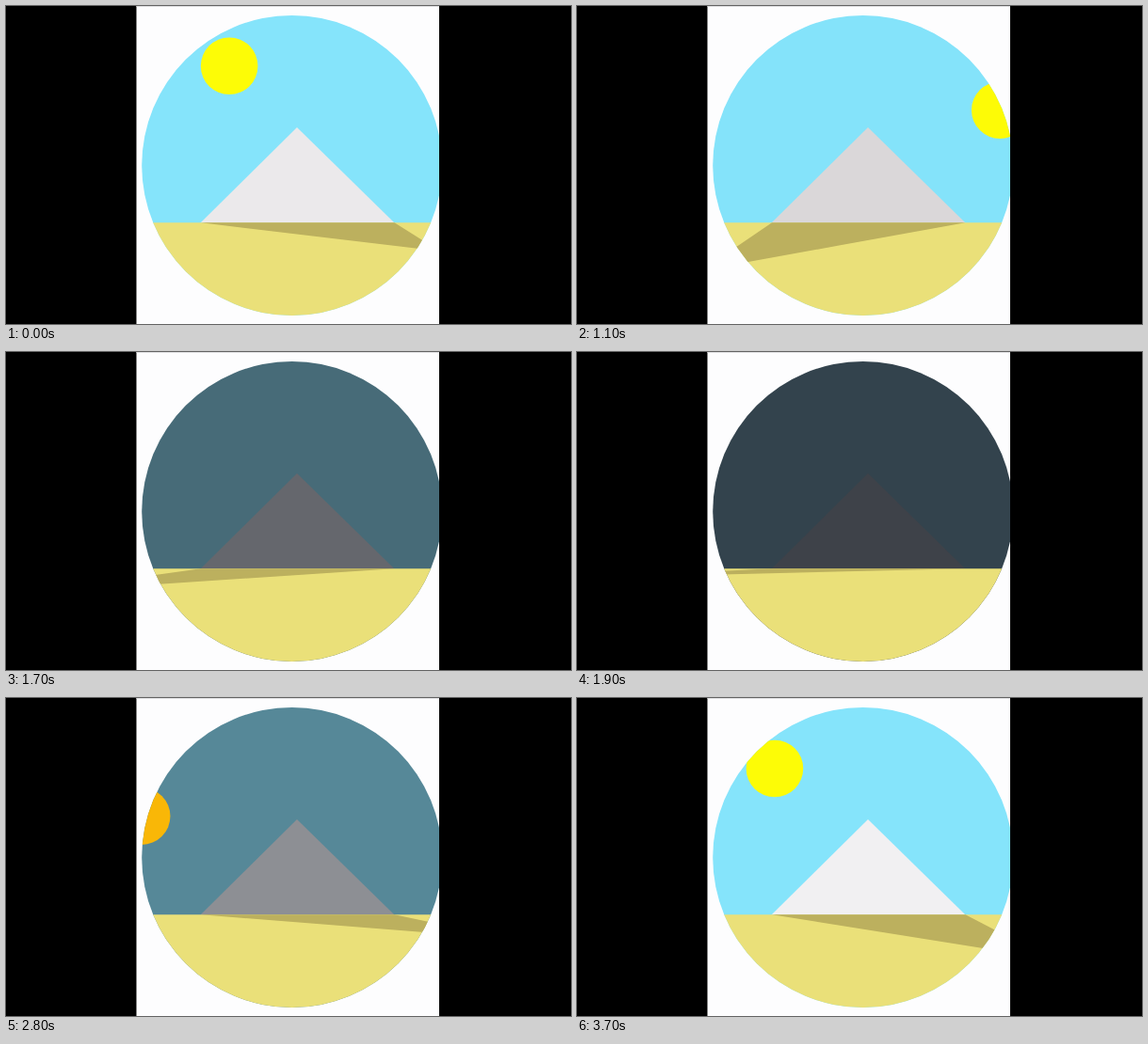
Write an HTML page that moves like this. It is 600 by 338 pixels and loops after 3800 ms.

```html
<!DOCTYPE html>
<html lang="en">
<head>
<meta charset="utf-8">
<title>Pyramid day</title>
<style>
  html, body { margin: 0; height: 100%; overflow: hidden; background: #000; }
  svg { display: block; width: 100vw; height: 100vh; }
</style>
</head>
<body>
<svg viewBox="0 0 600 338">
  <clipPath id="disc"><circle cx="303.7" cy="169.5" r="159.5"/></clipPath>
  <clipPath id="card"><path d="M138.5 0H460V338H138.5z"/></clipPath>
  <path fill="#000" d="M0 0H600V338H0z"/>
  <g clip-path="url(#card)">
    <path fill="#fdfdfe" d="M138 0H461V338H138z"/>
    <path fill="#dcdcde" d="M138 0H461V1H138z"/>
    <g clip-path="url(#disc)">
      <path id="sky" d="M138 0H470V338H138z"/>
      <circle id="sun" r="30.3"/>
      <path id="pyramid" d="M206.5 230.5L309 129L412.5 230.5z"/>
      <path fill="#eae079" d="M138 230.3H470V338H138z"/>
      <path id="shadow" fill="#bcb05e"/>
    </g>
  </g>
</svg>
<script>
const LOOP = 3800, STEP = 100;   // playback
const DAY = 4000, START = 1769, RATE = 0.994;
const $ = id => document.getElementById(id);

// cubic-bezier(.4, 0, .49, 1), solved by bisection
function ease(x) {
  let lo = 0, hi = 1, t;
  for (let i = 0; i < 24; i++) {
    t = (lo + hi) / 2;
    const s = 1 - t;
    if (1.2 * s * s * t + 1.47 * s * t * t + t * t * t < x) lo = t; else hi = t;
  }
  return t * t * (3 - 2 * t);
}

// keys: [[position, value or list of values], ...], eased between neighbours
function track(keys, p) {
  const i = keys.findIndex(k => k[0] > p);
  const [p0, a] = keys[i - 1], [p1, b] = keys[i];
  const e = ease((p - p0) / (p1 - p0));
  const mix = (u, v) => u + (v - u) * e;
  return Array.isArray(a) ? a.map((u, j) => mix(u, b[j])) : mix(a, b);
}

const NIGHT = [39, 44, 52], BLUE = [133, 228, 251];
const ORANGE = [245, 114, 9], YELLOW = [253, 252, 6];
const sky = [[0, NIGHT], [.3, BLUE], [.7, BLUE], [1, NIGHT]];
const sun = [[0, ORANGE], [.3, YELLOW], [.7, YELLOW], [1, ORANGE]];
const stone = [[0, NIGHT], [.3, [242, 241, 243]], [.7, [219, 216, 218]], [1, NIGHT]];
const angle = [[0, -70], [.3, -28], [1, 70]];
const tipX = [[0, 560], [.3, 512], [1, -9]];
const length = [[0, 0], [.3, 1], [.55, .4], [.75, 1], [1, 0]];

function draw(ms) {
  const p = (START + ms * RATE) % DAY / DAY;
  const paint = (id, keys) =>
    $(id).setAttribute('fill', `rgb(${track(keys, p).map(Math.round)})`);
  paint('sky', sky);
  paint('sun', sun);
  paint('pyramid', stone);
  const a = track(angle, p) * Math.PI / 180;
  $('sun').setAttribute('cx', 303.9 + 212 * Math.sin(a));
  $('sun').setAttribute('cy', 265 - 212 * Math.cos(a));
  const tipY = 230.3 + 51.7 * track(length, p);
  $('shadow').setAttribute('d', `M207 230.3H412.5L${track(tipX, p)} ${tipY}z`);
}

const begin = performance.now();
function frame() {
  const ms = (performance.now() - begin) % LOOP;
  draw(Math.floor(ms / STEP) * STEP);
  requestAnimationFrame(frame);
}
frame();
</script>
</body>
</html>
```
